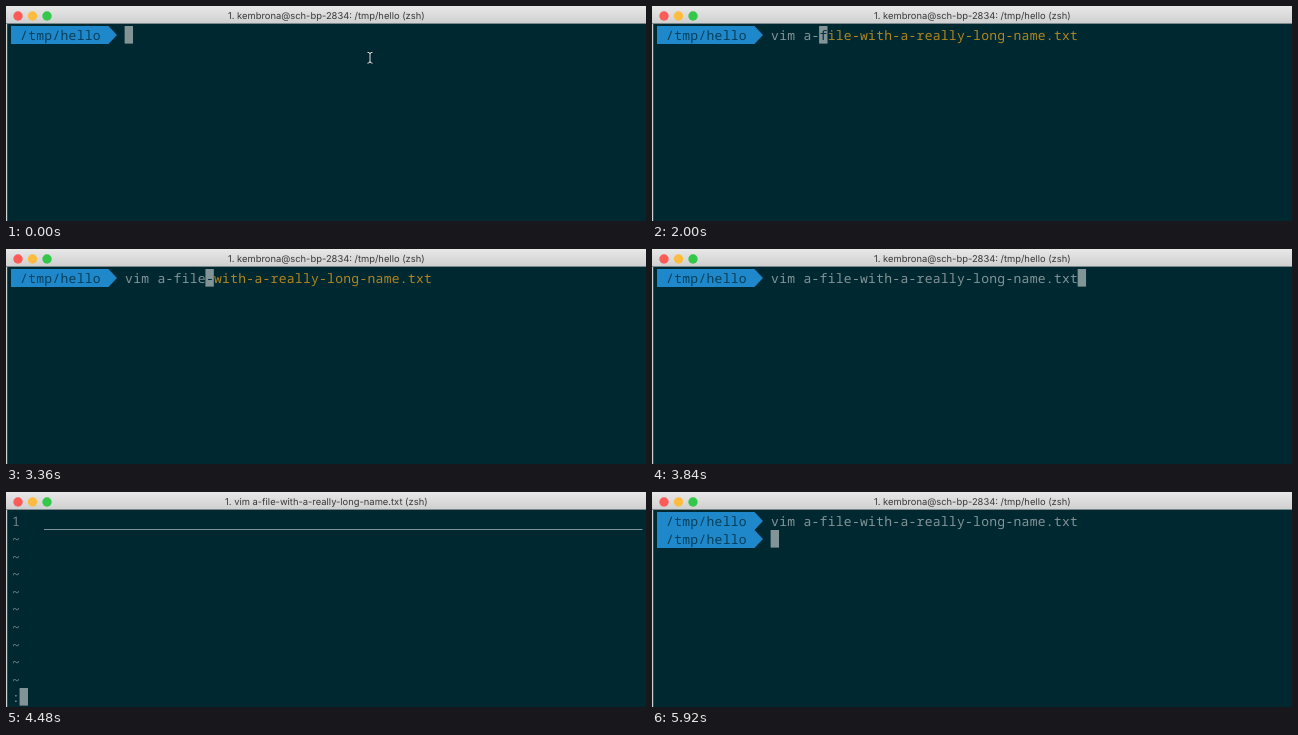
An HTML page that plays this animation: 640 by 215 pixels, repeating every 6320 ms.

```html
<!DOCTYPE html>
<html lang="en">
<head>
<meta charset="utf-8">
<title>Terminal</title>
<style>
  html, body { margin: 0; width: 100%; height: 100%; overflow: hidden; background: #002831; }
  svg { display: block; width: 640px; height: 215px; }
  text { white-space: pre; text-rendering: geometricPrecision; }
  .mono { font: 13px "Noto Sans Mono", "DejaVu Sans Mono", monospace; letter-spacing: calc(8.08px - .6em); }
  #title { font: 9.4px Inter, Roboto, sans-serif; fill: #383838; text-anchor: middle; }
  .typed { fill: #839496; }
  .hint { fill: #b08620; }
  .dark { fill: #002f3b; }
  .path { fill: #073f5a; }
  .dim { fill: #70868c; }
  .block { fill: #839496; }
</style>
</head>
<body>
<svg viewBox="0 0 640 215">
  <defs>
    <linearGradient id="bar" x2="0" y2="1">
      <stop offset="0" stop-color="#e9e8e9"/>
      <stop offset="1" stop-color="#d1d0d1"/>
    </linearGradient>
  </defs>
  <rect width="640" height="215" fill="#002831"/>
  <rect y="17" width="1.2" height="198" fill="#ccd2d2"/>
  <rect width="640" height="17" fill="url(#bar)"/>
  <rect y="17" width="640" height="1" fill="#7a8a8c"/>
  <circle cx="12" cy="10" r="4.7" fill="#fc5b57"/>
  <circle cx="26.5" cy="10" r="4.7" fill="#fdbc40"/>
  <circle cx="41" cy="10" r="4.7" fill="#34c84a"/>
  <text id="title" x="320.3" y="13.2"></text>
  <g id="screen"></g>
  <g id="mouse" fill="none" stroke-linecap="round">
    <path id="beam" d="M361.8 46.3Q364 46.3 364 48Q364 46.3 366.2 46.3M364 48V55.5M361.8 57.2Q364 57.2 364 55.5Q364 57.2 366.2 57.2"/>
  </g>
</svg>
<script>
const LOOP = 6320, CELL = 8.08, ROW = 17.6, LEFT = 6, TOP = 20.3, INPUT = 14;
const FIRST = 'vim another-file-with-a-long-name.txt';
const FULL = 'vim a-file-with-a-really-long-name.txt';
const SHELL = '1. kembrona@sch-bp-2834: /tmp/hello (zsh)';
const EDITOR = '1. ' + FULL + ' (zsh)';

// [start ms, view, ...arguments]
const steps = [
  [0, shell, '', 0],
  [480, shell, FIRST, 1],
  [640, shell, FIRST, 2],
  [1040, shell, FIRST, 3],
  [1200, shell, FIRST, 4],
  [1760, shell, FIRST, 5],
  [1920, shell, FULL, 6],
  [2080, shell, FULL, 7],
  [2240, shell, FULL, 8],
  [2400, shell, FULL, 9],
  [2640, shell, FULL, 10],
  [3440, shell, FULL, FULL.length],
  [3920, vim, ''],
  [4240, vim, ':'],
  [4560, vim, ':q'],
  [4800, done, false],
  [4880, done, true]
];

const $ = id => document.getElementById(id);
const colX = c => LEFT + c * CELL;
const rowY = r => Math.round(TOP + r * ROW);

function text(col, row, str, cls) {
  return `<text class="mono ${cls}" x="${colX(col)}" y="${rowY(row) + 14}">${str}</text>`;
}

function cursor(col, row, under = '') {
  return `<rect class="block" x="${colX(col) - .5}" y="${rowY(row)}" width="8.4" height="${ROW}"/>`
    + text(col, row, under, 'dark');
}

function prompt(row) {
  const y = rowY(row), x = colX(12) - .5, h = 18;
  return `<path fill="#1e88cb" d="M5 ${y}H${x}L${x + 8.5} ${y + h / 2}L${x} ${y + h}H5Z"/>`
    + text(1, row, '/tmp/hello', 'path');
}

function shell(line, count) {
  const at = INPUT + count;
  return prompt(0)
    + text(INPUT, 0, line.slice(0, count), 'typed')
    + text(at + 1, 0, line.slice(count + 1), 'hint')
    + cursor(at, 0, line.charAt(count));
}

function vim(command) {
  let out = text(0, 0, '1', 'dim')
    + '<rect class="block" x="38" y="37" width="598.5" height="1"/>';
  for (let r = 1; r < 10; r++) out += text(0, r, '~', 'dim');
  return out + text(0, 10, command, 'typed')
    + (command ? cursor(command.length, 10) : cursor(4, 0));
}

function done(ready) {
  return prompt(0) + text(INPUT, 0, FULL, 'typed')
    + (ready ? prompt(1) + cursor(INPUT, 1) : cursor(0, 1));
}

// Light pointer over a wider dark outline
const outline = $('beam'), core = outline.cloneNode();
core.removeAttribute('id');
outline.setAttribute('stroke', '#00141a');
outline.setAttribute('stroke-width', 2.2);
core.setAttribute('stroke', '#e8eeee');
$('mouse').append(core);

let shown = null;
function draw() {
  const t = performance.now() % LOOP;
  const step = steps.findLast(s => s[0] <= t);
  if (step !== shown) {
    const [start, view, ...args] = shown = step;
    $('screen').innerHTML = view(...args);
    $('title').textContent = view === vim ? EDITOR : SHELL;
    $('mouse').style.display = start ? 'none' : '';
  }
  requestAnimationFrame(draw);
}
draw();
</script>
</body>
</html>
```
